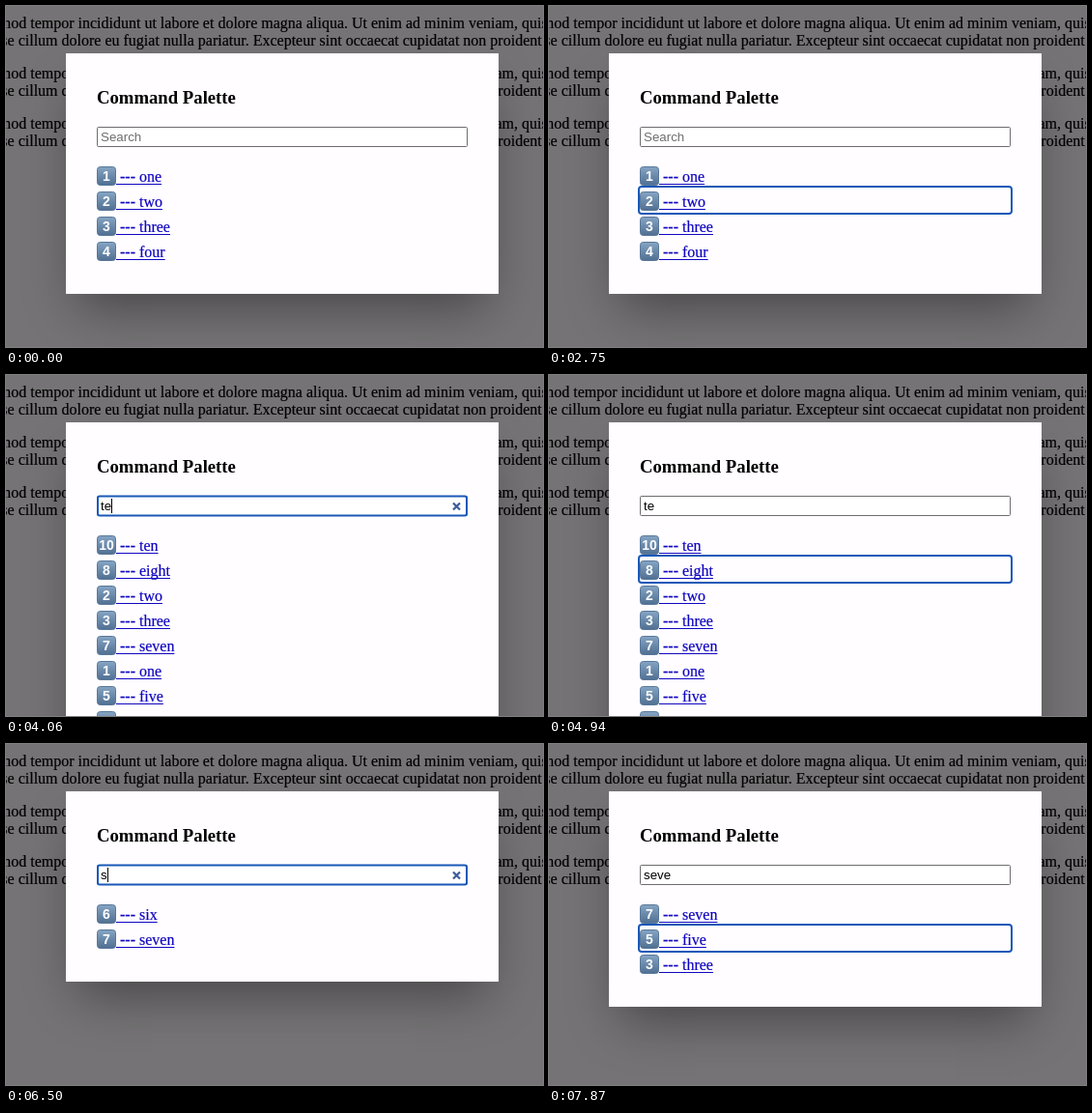
These frames come from a looping animation (556x353 px, 8000 ms). An HTML page:

```html
<!DOCTYPE html>
<html lang="en">
<head>
<meta charset="utf-8">
<title>Command Palette</title>
<style>
  html, body { margin: 0; width: 100%; height: 100%; overflow: hidden; background: #757375; }
  #stage { position: relative; width: 100%; height: 100%; overflow: hidden; contain: strict; }
  svg { position: absolute; left: 0; top: 0; width: 100%; height: 100%; }
  text { white-space: pre; font: 16px "Liberation Serif", Times, serif; }
  #page text { stroke: #000; stroke-width: .2; }
  #dialog {
    position: absolute; left: 62px; top: 49px; width: 448px; background: #fffdff;
    box-shadow: 0 25px 50px -12px rgba(0, 0, 0, .4);
  }
  #title { font-size: 18.72px; font-weight: bold; }
  #query { font: 13.33px "Liberation Sans", Arial, sans-serif; }
  .link { fill: #1006c0; stroke: #1006c0; stroke-width: .2; }
  .line { fill: #1006c0; }
  .key { fill: #fff; font: bold 14px "Liberation Sans", Arial, sans-serif; text-anchor: middle; }
  .ring { fill: none; stroke: #1a58b8; stroke-width: 2; }
</style>
</head>
<body>
<div id="stage">
<svg id="page"></svg>
<div id="dialog"></div>
<svg>
  <defs>
    <linearGradient id="cap" x2="0" y2="1">
      <stop offset="0" stop-color="#86a5c4"/>
      <stop offset="1" stop-color="#506f92"/>
    </linearGradient>
  </defs>
  <text id="title" x="94" y="101">Command Palette</text>
  <rect id="field" x="94.5" y="125.5" width="383" height="20" rx="1" fill="#fff" stroke="#6e6c6e"/>
  <rect id="fieldRing" class="ring" x="95" y="125.5" width="382" height="20" rx="2" style="fill:#fff"/>
  <text id="query" x="98" y="140"></text>
  <rect id="caret" y="128" width="1" height="15"/>
  <path id="clear" d="M463 132.5l7 7m0-7l-7 7" stroke="#3c5a9c" stroke-width="2.2"/>
  <g id="list"></g>
  <rect id="rowRing" class="ring" x="93" width="386" height="28" rx="3"/>
  <g id="mouse">
    <path id="arrow" d="M0 0V14.5L3.3 11.5L5.6 17L8 16L5.7 10.6H10.2Z" fill="#000" stroke="#fff" stroke-linejoin="round"/>
    <path id="beam" d="M-2.5-8Q0-8 0-6Q0-8 2.5-8M0-6V6M-2.5 8Q0 8 0 6Q0 8 2.5 8" fill="none" stroke="#000"/>
  </g>
</svg>
</div>
<script>
const LOOP = 8000, INPUT = -1, NONE = -2;
const $ = id => document.getElementById(id);
const names = ["", "one", "two", "three", "four", "five", "six", "seven", "eight", "nine", "ten"];

// Rows listed for each query
const results = {
  "": [1, 2, 3, 4],
  t: [2, 3, 10, 8],
  te: [10, 8, 2, 3, 7, 1, 5, 9],
  s: [6, 7],
  se: [7, 6, 10, 8, 1, 3, 5, 9],
  sev: [7],
  seve: [7, 5, 3]
};

// [time, query, focused row]
const steps = [
  [0, "", NONE], [1120, "", INPUT],
  [2370, "", 0], [2620, "", 1], [2870, "", 2], [3190, "", 1], [3310, "", 0], [3440, "", INPUT],
  [3690, "t", INPUT], [4000, "te", INPUT], [4190, "te", INPUT],
  [4620, "te", 0], [4870, "te", 1], [5060, "te", 0], [5310, "te", INPUT],
  [6000, "t", INPUT], [6190, "", INPUT], [6440, "s", INPUT],
  [6620, "se", INPUT], [6810, "sev", INPUT], [7060, "seve", INPUT],
  [7310, "seve", 0], [7440, "seve", 1], [7620, "seve", 2], [7810, "seve", 1]
];

// [time, x, y]
const path = [[500, 362, 350], [750, 356, 235], [1000, 352, 142], [1190, 352, 149],
  [1370, 352, 149], [1620, 396, 97], [2370, 396, 97]];

function add(parent, tag, attrs, text = "") {
  const el = document.createElementNS("http://www.w3.org/2000/svg", tag);
  for (const k in attrs) el.setAttribute(k, attrs[k]);
  el.textContent = text;
  return parent.appendChild(el);
}

function show(id, on) {
  $(id).style.display = on ? "" : "none";
}

const lorem = [
  [-33, "eiusmod tempor incididunt ut labore et dolore magna aliqua. Ut enim ad minim veniam, quis"],
  [-18, "esse cillum dolore eu fugiat nulla pariatur. Excepteur sint occaecat cupidatat non proident"]
];
for (let p = 0; p < 3; p++)
  lorem.forEach(([x, line], i) => add($("page"), "text", { x, y: 23 + 52 * p + 18 * i }, line));

const rows = results.te.map((_, i) => {
  const g = add($("list"), "g", { transform: `translate(94 ${166 + 26 * i})` });
  const link = add(g, "text", { class: "link", x: 20, y: 16 });
  const line = add(g, "rect", { class: "line", x: 20, y: 18, height: 1 });
  add(g, "rect", { x: .5, y: .5, width: 19, height: 19, rx: 3, fill: "url(#cap)", stroke: "#58789a" });
  const key = add(g, "text", { class: "key", x: 10, y: 15 });
  return { g, link, line, key };
});

let current;
function apply(step) {
  if (step === current) return;
  current = step;
  const [, query, focus] = step, items = results[query];
  rows.forEach(({ g, link, line, key }, i) => {
    g.style.display = i < items.length ? "" : "none";
    if (i >= items.length) return;
    link.textContent = " --- " + names[items[i]];
    line.setAttribute("width", link.getComputedTextLength());
    key.textContent = items[i];
  });
  $("dialog").style.height = 145 + 26 * items.length + "px";
  $("query").textContent = query || "Search";
  $("query").setAttribute("fill", query ? "#000" : "#6f6d6f");
  show("fieldRing", focus === INPUT);
  show("clear", focus === INPUT && query);
  show("rowRing", focus >= 0);
  $("rowRing").setAttribute("y", 161 + 26 * focus);
  $("caret").setAttribute("x", query ? 98 + Math.round($("query").getComputedTextLength()) : 98);
}

function moveMouse(t) {
  const i = path.findIndex(p => p[0] > t);
  show("mouse", i > 0);
  if (i < 1) return;
  const [t0, x0, y0] = path[i - 1], [t1, x1, y1] = path[i];
  const k = (t - t0) / (t1 - t0);
  const x = x0 + (x1 - x0) * k, y = y0 + (y1 - y0) * k;
  $("mouse").setAttribute("transform", `translate(${x} ${y})`);
  const overField = y > 125 && y < 146;
  show("arrow", !overField);
  show("beam", overField);
}

function render(t) {
  const step = steps.findLast(s => s[0] <= t);
  apply(step);
  show("caret", step[2] === INPUT && (t - step[0]) % 1000 < 500);
  moveMouse(t);
}

const start = performance.now();
function tick() {
  render((performance.now() - start) % LOOP);
  requestAnimationFrame(tick);
}
tick();
</script>
</body>
</html>
```
